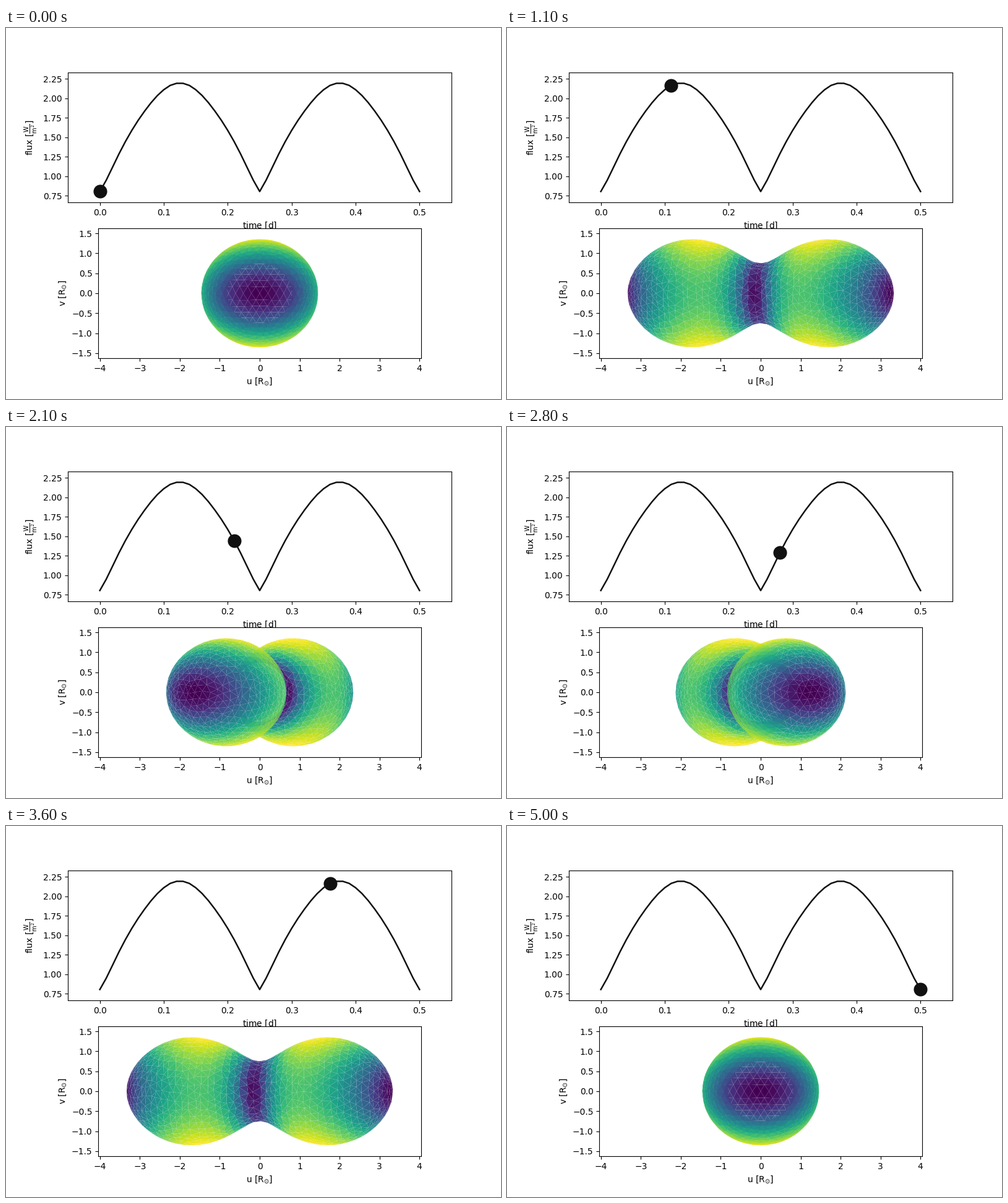
A matplotlib script for the animation above (5.1 s loop, 800 by 600 pixels).

```python
import numpy as np
import matplotlib.pyplot as plt
from matplotlib.animation import FuncAnimation
from matplotlib.collections import PolyCollection
from matplotlib.tri import Triangulation

SMA = 3.35          # separation of the two centres, solar radii
POT = 3.4013774     # potential of the shared envelope, equal masses
EDGE = 0.0583       # triangle side in units of the separation
N_FRAMES = 51
INK = "#111111"


# --- equipotential surface, x along the line of centres -------------------
def potential(x, y, z):
    c = y**2 + z**2
    r1 = np.sqrt((x - 0.5)**2 + c)
    r2 = np.sqrt((x + 0.5)**2 + c)
    return 1 / r1 + 1 / r2 + x**2 + y**2 - 0.25


def gradient(p):
    x, y, z = np.moveaxis(p, -1, 0)
    c = y**2 + z**2
    k1 = ((x - 0.5)**2 + c)**-1.5
    k2 = ((x + 0.5)**2 + c)**-1.5
    return np.stack([2 * x - (x - 0.5) * k1 - (x + 0.5) * k2,
                     2 * y - y * (k1 + k2),
                     -z * (k1 + k2)], axis=-1)


def bisect(inside, lo, hi):
    for _ in range(50):
        mid = (lo + hi) / 2
        ok = inside(mid)
        lo, hi = np.where(ok, mid, lo), np.where(ok, hi, mid)
    return lo


def radius(x, theta):
    """Distance of the surface from the axis at x, in direction theta."""
    return bisect(lambda r: potential(x, r * np.cos(theta), r * np.sin(theta)) > POT,
                  np.full_like(x, 1e-9), np.full_like(x, 0.5))


def build_mesh():
    rng = np.random.default_rng(4)
    tip = float(bisect(lambda x: potential(x, 0.0, 0.0) > POT, 0.91, 1.2))

    # Mean meridian: arc length s and conformal radius
    xs = tip * np.cos(np.linspace(0, np.pi, 2000))
    rs = radius(xs, np.full_like(xs, np.pi / 4))
    ds = np.hypot(np.diff(xs), np.diff(rs))
    s_grid = np.r_[0, np.cumsum(ds)]
    log_r = np.r_[0, np.cumsum(ds / ((rs[1:] + rs[:-1]) / 2))]
    total = s_grid[-1]

    # Hexagonal cap around the first tip
    i, j = np.meshgrid(np.arange(-9, 10), np.arange(-9, 10))
    px, py = (i + j / 2).ravel() * EDGE, (j * np.sqrt(0.75)).ravel() * EDGE
    dist = np.hypot(px, py)
    keep = dist < 5.6 * EDGE
    s_all, t_all = [dist[keep]], [np.arctan2(py, px)[keep]]

    # Rings along the rest of the envelope
    first, last = 6.2 * EDGE, total - EDGE
    rings = np.linspace(first, last, int(round((last - first) / (EDGE * 0.866))) + 1)
    for s in rings:
        rho = np.interp(s, s_grid, rs)
        n = max(6, int(round(2 * np.pi * rho / EDGE)))
        wobble = 0.0 if s == rings[-1] else 0.2 * EDGE
        s_all.append(s + wobble * rng.uniform(-1, 1, n))
        t_all.append((np.arange(n) + rng.uniform()) * 2 * np.pi / n
                     + wobble / rho * rng.uniform(-1, 1, n))
    s, theta = np.concatenate(s_all), np.concatenate(t_all)

    # Triangulate in the conformal plane, then close the second tip
    flat = np.exp(np.interp(s, s_grid, log_r) - 8)
    tri = Triangulation(flat * np.cos(theta), flat * np.sin(theta))
    t, e = np.nonzero(tri.neighbors == -1)
    rim = np.column_stack([tri.triangles[t, e], tri.triangles[t, (e + 1) % 3],
                           np.full(len(t), len(s))])
    x = np.interp(s, s_grid, xs)
    rho = radius(x, theta)
    points = np.column_stack([x, rho * np.cos(theta), rho * np.sin(theta)])
    points = np.vstack([points, [-tip, 0, 0]])
    return points[np.vstack([tri.triangles, rim])]


faces = build_mesh()
centers = faces.mean(axis=1)
normals = np.cross(faces[:, 1] - faces[:, 0], faces[:, 2] - faces[:, 0])
normals *= -np.sign((normals * gradient(centers)).sum(axis=1))[:, None]
# Gravity darkening, averaged over the corners of each face
teff = (np.linalg.norm(gradient(faces), axis=-1)**0.08).mean(axis=1)

# --- light curve ----------------------------------------------------------
rise = [0.806, 0.951, 1.12, 1.29, 1.447, 1.59, 1.72,
        1.837, 1.944, 2.037, 2.112, 2.167, 2.194]
times = np.arange(N_FRAMES) * 0.01
flux = [rise[min(k % 25, 25 - k % 25)] for k in range(N_FRAMES)]

# --- figure ---------------------------------------------------------------
plt.rcParams["font.family"] = "DejaVu Sans"
fig, (ax_flux, ax_mesh) = plt.subplots(2, 1, figsize=(8, 6), dpi=100)

ax_flux.plot(times, flux, color=INK, lw=1.8)
marker, = ax_flux.plot([], [], "o", color=INK, ms=15.9, mew=0, zorder=5)
ax_flux.set(xlim=(-0.05, 0.55), ylim=(0.6665, 2.3325),
            xlabel=r"time [$\mathrm{d}$]", ylabel=r"flux [$\mathrm{\frac{W}{m^{2}}}$]")
ax_flux.set_yticks(np.arange(0.75, 2.3, 0.25))

mesh = PolyCollection([], cmap="viridis", edgecolors="none", linewidths=0)
mesh.set_clim(teff.min(), teff.max())
ax_mesh.add_collection(mesh)
ax_mesh.set_aspect("equal")
ax_mesh.set(xlim=(-4.04, 4.04), ylim=(-1.627, 1.627),
            xlabel=r"u [$\mathrm{R_{\odot}}$]", ylabel=r"v [$\mathrm{R_{\odot}}$]")
ax_mesh.set_xticks(range(-4, 5))
ax_mesh.set_yticks(np.arange(-1.5, 1.6, 0.5))


def draw(k):
    phi = 2 * np.pi * times[k] / 0.5
    sin, cos = np.sin(phi), np.cos(phi)

    def depth(p):
        return p[:, 0] * cos - p[:, 1] * sin

    # Only faces turned to the viewer, farthest first
    seen = np.nonzero(depth(normals) > 0)[0]
    seen = seen[np.argsort(depth(centers[seen]))]
    x, y, z = np.moveaxis(faces[seen], 2, 0)
    mesh.set_verts(SMA * np.stack([x * sin + y * cos, z], axis=2))
    mesh.set_array(teff[seen])
    marker.set_data([times[k]], [flux[k]])
    return mesh, marker


anim = FuncAnimation(fig, draw, frames=N_FRAMES, interval=100, repeat=True, repeat_delay=0)
plt.show()
```
